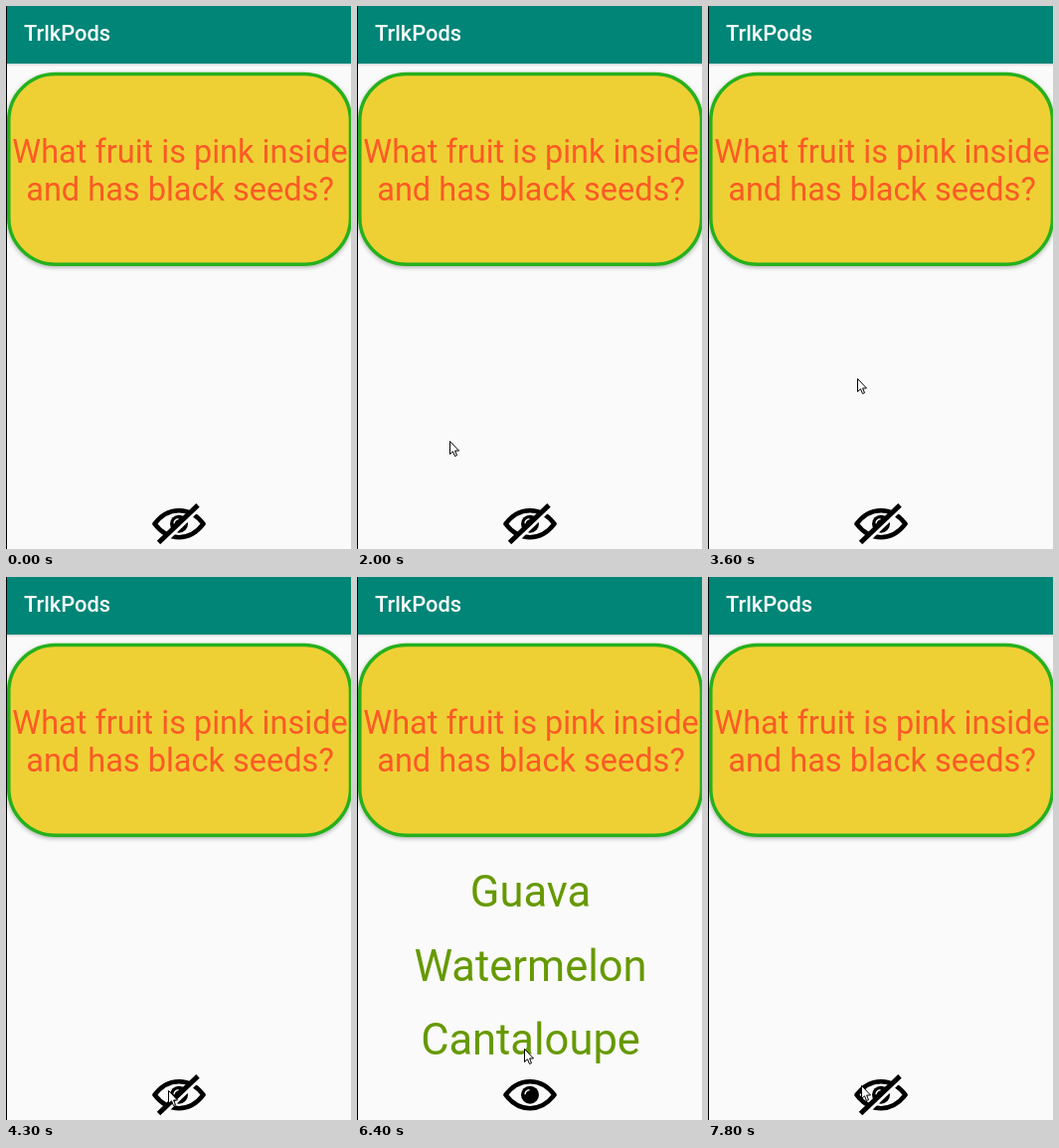
An HTML page that plays this animation: 347x547 px, repeating every 8 s.

```html
<!DOCTYPE html>
<html lang="en">
<head>
<meta charset="utf-8">
<title>Flash card</title>
<style>
  html, body { margin: 0; width: 100%; height: 100%; overflow: hidden; background: #fafafa; }
  svg { display: block; width: 347px; height: 547px; }
  text { font-family: Roboto, sans-serif; }
  .title { font-size: 21.8px; font-weight: 500; fill: #fff; }
  .question { font-size: 32.5px; fill: #fb5a25; text-anchor: middle; }
  .answer { font-size: 43.5px; fill: #669900; text-anchor: middle; }
</style>
</head>
<body>
<svg viewBox="0 0 347 547">
  <defs>
    <linearGradient id="fade" x2="0" y2="1">
      <stop stop-color="#000" stop-opacity=".15"/>
      <stop offset="1" stop-color="#000" stop-opacity="0"/>
    </linearGradient>
    <filter id="soft" x="-5%" y="-5%" width="110%" height="115%">
      <feDropShadow dx="0" dy="1.5" stdDeviation="2.2" flood-opacity=".3"/>
    </filter>
  </defs>

  <rect width="347" height="547" fill="#fafafa"/>
  <rect width="347" height="58" fill="#008577"/>
  <rect y="58" width="347" height="3" fill="url(#fade)"/>
  <text class="title" x="18" y="35">TrlkPods</text>

  <rect x="2.8" y="68.5" width="343.7" height="191.8" rx="47" fill="#eed036" stroke="#27b01c" stroke-width="3.5" filter="url(#soft)"/>
  <text class="question" x="175" y="157.7">What fruit is pink inside</text>
  <text class="question" x="175" y="195.7">and has black seeds?</text>
  <rect width="1" height="547"/>

  <g id="answers">
    <text class="answer" x="174.5" y="332">Guava</text>
    <text class="answer" x="174.5" y="407">Watermelon</text>
    <text class="answer" x="174.5" y="481">Cantaloupe</text>
  </g>

  <g transform="translate(174 521.7)" fill="none" stroke="#000">
    <path d="M-24.5 0C-11-18 11-18 24.5 0C11 18-11 18-24.5 0Z" stroke-width="4.6" stroke-linejoin="round"/>
    <circle r="9" fill="#000" stroke="none"/>
    <path d="M-5-.5A5 5 0 0 1-.5-5" stroke="#fafafa" stroke-width="1.4"/>
    <g id="slash">
      <path d="M-18 20.5L21.5-17.5" stroke="#fafafa" stroke-width="5"/>
      <path d="M-20.5 18.8L19-18.8" stroke-width="5"/>
    </g>
  </g>

  <path id="cursor" d="M.5.5V13.5L3.5 10.8L5.5 15.5L7.5 14.7L5.6 10H9.5Z" fill="#fff" stroke="#000"/>
</svg>
<script>
  const LOOP = 8000, STEP = 100, GLIDE = 300;
  const REVEAL = 4700, HIDE = 7800;

  // The pointer rests at each stop and glides into the next one: arrival time, x, y
  const stops = [
    [900, 176, 32], [1100, 302, 246], [1300, 114, 479], [2000, 93, 438],
    [2900, 162, 386], [3100, 146, 276], [3300, 162, 230], [3700, 144, 447],
    [4100, 163, 517], [6400, 168, 475], [7000, 156, 397], [7500, 154, 512]
  ];

  const byId = id => document.getElementById(id);
  const show = (id, visible) => byId(id).setAttribute('visibility', visible ? 'visible' : 'hidden');

  function pointerAt(t) {
    const index = stops.findLastIndex(([time]) => time <= t);
    if (index < 0) return null;
    const [leave, x, y] = stops[index];
    const [arrive, nextX, nextY] = stops[index + 1] ?? [LOOP + GLIDE, x, y];
    const begin = Math.max(leave, arrive - GLIDE);
    const progress = Math.max(0, (t - begin) / (arrive - begin));
    return [x + (nextX - x) * progress, y + (nextY - y) * progress].map(Math.round);
  }

  function draw(t) {
    const revealed = t >= REVEAL && t < HIDE;
    show('answers', revealed);
    show('slash', !revealed);

    const spot = pointerAt(Math.floor(t / STEP) * STEP);
    show('cursor', spot);
    if (spot) byId('cursor').setAttribute('transform', `translate(${spot})`);
  }

  const start = performance.now();
  function tick() {
    draw((performance.now() - start) % LOOP);
    requestAnimationFrame(tick);
  }
  tick();
</script>
</body>
</html>
```
